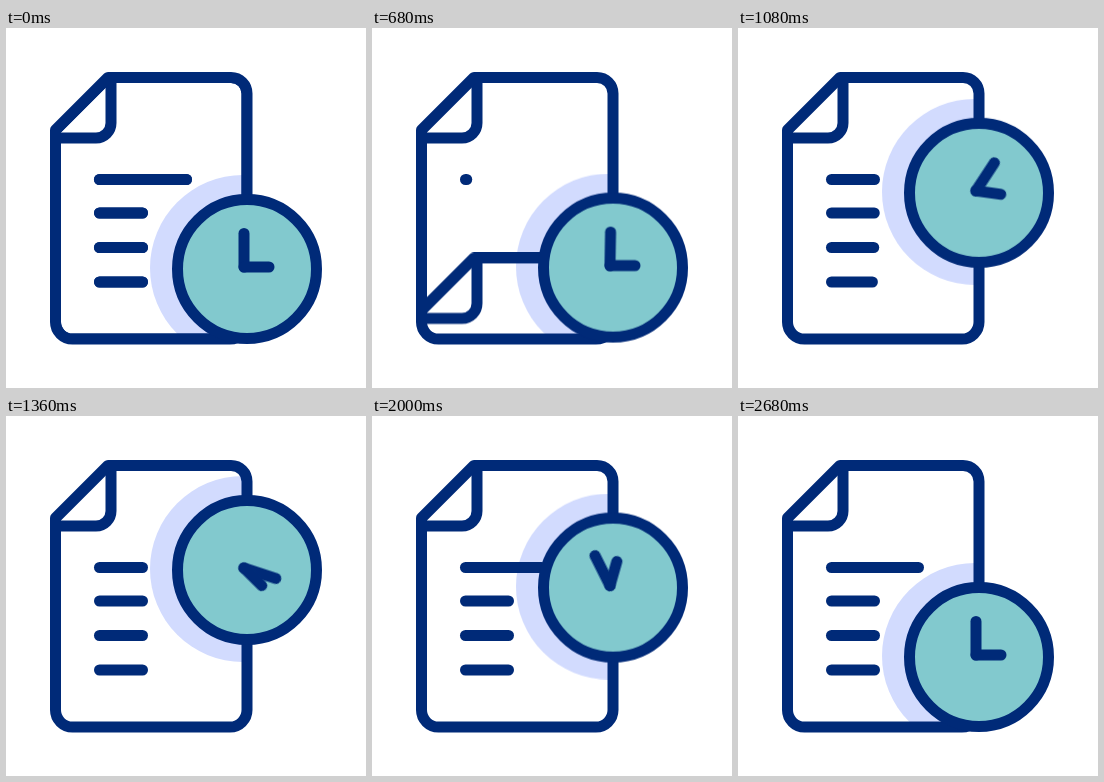
Write an HTML page that moves like this. It is 360 px wide and 360 px high and loops after 3 s.

```html
<!DOCTYPE html>
<html lang="en">
<head>
<meta charset="utf-8">
<title>Document and clock</title>
<style>
  :root {
    --navy: #002a78;
    --teal: #82c9ce;
    --lilac: #d2dbfe;
  }
  html, body { margin: 0; width: 100%; height: 100%; overflow: hidden; background: #fff; }
  svg { display: block; width: 100%; height: 100%; }

  .ink { fill: none; stroke: var(--navy); stroke-width: 11; stroke-linecap: round; stroke-linejoin: round; }
  .slide, .bob, .minute, .hour, .text, .grow, .title, .shrink {
    animation: 3s linear infinite both;
  }
  .slide { animation-name: slide; }
  .bob { animation-name: bob; }
  .minute { animation-name: minute; }
  .hour { animation-name: hour; }
  .text { animation-name: text; }
  .grow { animation-name: grow; stroke-dasharray: 43 200; }
  .title { animation-name: title; stroke-dasharray: 87 200; }
  .shrink { animation-name: shrink; stroke-dasharray: 87 200; }
  .d1 { animation-delay: 37ms; }
  .d2 { animation-delay: 74ms; }
  .d3 { animation-delay: 120ms; }

  /* Moves are cubic in-out: (.333, 0, .667, 0) is t^3, (.333, 1, .667, 1) its mirror. */

  /* top sheet drops out of the page */
  @keyframes slide {
    0%, 10.667% { transform: translateY(0); animation-timing-function: cubic-bezier(.333, 0, .667, 0); }
    21.167% { transform: translateY(131px); animation-timing-function: cubic-bezier(.333, 1, .667, 1); }
    31.667%, 100% { transform: translateY(262px); }
  }
  @keyframes shrink {
    0%, 10.667% { stroke-dashoffset: 0; animation-timing-function: ease-in-out; }
    21.333%, 100% { stroke-dashoffset: 44; }
  }

  /* new text is written */
  @keyframes text {
    0%, 10.666% { visibility: visible; }
    10.667%, 22.4% { visibility: hidden; }
    22.401%, 100% { visibility: visible; }
  }
  @keyframes grow {
    0%, 15% { stroke-dashoffset: 0; }
    15.1%, 22.5% { stroke-dashoffset: 43.5; animation-timing-function: cubic-bezier(.333, 1, .667, 1); }
    37.5%, 100% { stroke-dashoffset: 0; }
  }
  @keyframes title {
    0%, 15% { stroke-dashoffset: 0; }
    15.1%, 22.5% { stroke-dashoffset: 87.5; animation-timing-function: cubic-bezier(.333, 1, .667, 1); }
    37.5%, 46.667% { stroke-dashoffset: 44; animation-timing-function: ease-in-out; }
    77.333%, 100% { stroke-dashoffset: 0; }
  }

  /* clock travels up and back while the hands turn */
  @keyframes bob {
    0%, 18.667% { transform: translateY(0); animation-timing-function: cubic-bezier(.333, 0, .667, 0); }
    31.333% { transform: translateY(-43.5px); animation-timing-function: cubic-bezier(.333, 1, .667, 1); }
    44%, 57.333% { transform: translateY(-87px); animation-timing-function: cubic-bezier(.333, 0, .667, 0); }
    70% { transform: translateY(-43.5px); animation-timing-function: cubic-bezier(.333, 1, .667, 1); }
    82.667%, 100% { transform: translateY(0); }
  }
  @keyframes minute {
    0%, 16.667% { transform: rotate(0deg); animation-timing-function: cubic-bezier(.333, 0, .667, 0); }
    50.667% { transform: rotate(180deg); animation-timing-function: cubic-bezier(.333, 1, .667, 1); }
    84.667%, 100% { transform: rotate(360deg); }
  }
  @keyframes hour {
    0%, 24% { transform: rotate(0deg); animation-timing-function: cubic-bezier(.333, 0, .667, 0); }
    58% { transform: rotate(180deg); animation-timing-function: cubic-bezier(.333, 1, .667, 1); }
    92%, 100% { transform: rotate(360deg); }
  }
</style>
</head>
<body>
<svg viewBox="0 0 360 360">
  <defs>
    <path id="page" d="M102 49.5H225a16 16 0 0 1 16 16V294a17 17 0 0 1-17 17H66.500a17 17 0 0 1-17-17V102Z"/>
    <path id="fold" d="M105 51V95a15 15 0 0 1-15 15H51"/>
    <clipPath id="inside"><use href="#page"/></clipPath>
  </defs>

  <use class="ink" href="#fold"/>
  <g clip-path="url(#inside)">
    <use class="slide" href="#page" fill="#fff"/>
    <circle class="bob" cx="237" cy="240" r="93" fill="var(--lilac)"/>
    <g class="ink slide">
      <use href="#page"/>
      <use href="#fold"/>
      <path class="shrink" d="M93.500 151.500h87"/>
      <path d="M93.500 185h43M93.500 219.500h43M93.500 254h43"/>
    </g>
  </g>
  <use class="ink" href="#page"/>

  <g class="ink text">
    <path class="title" d="M93.500 151.500h87"/>
    <path class="grow d1" d="M93.500 185h43"/>
    <path class="grow d2" d="M93.500 219.500h43"/>
    <path class="grow d3" d="M93.500 254h43"/>
  </g>

  <g class="bob">
    <circle class="ink" cx="241" cy="241" r="69.500" style="fill: var(--teal)"/>
    <g class="ink" transform="translate(238 239)">
      <path class="minute" d="M0 0V-33.500"/>
      <path class="hour" d="M0 0H25"/>
    </g>
  </g>
</svg>
</body>
</html>
```
